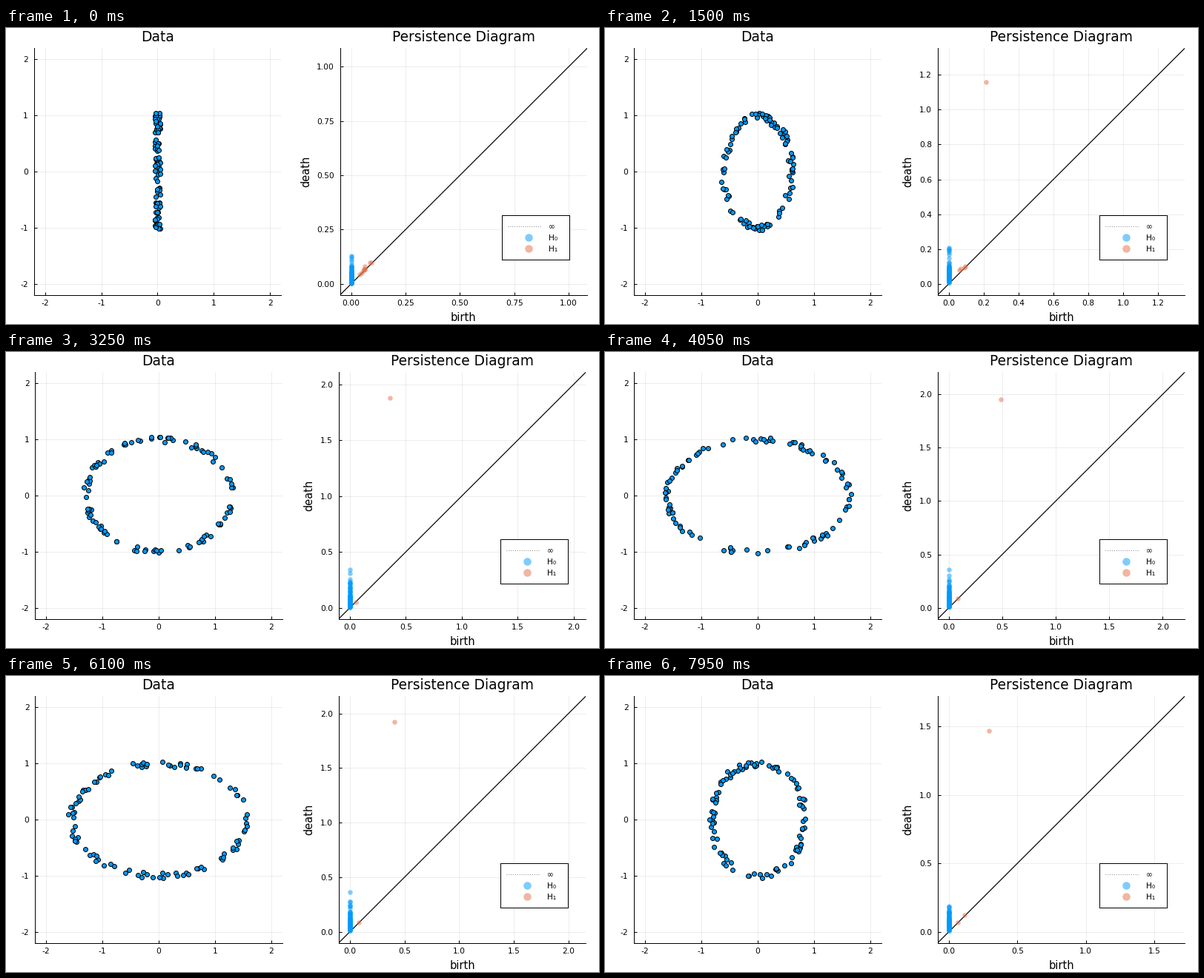
Animation of 800x400 px, one loop 8000 ms. Source, as a matplotlib script:

```python
import numpy as np
import matplotlib.pyplot as plt
from matplotlib.animation import FuncAnimation

W, H = 800, 400
FRAMES, INTERVAL = 160, 50
N = 100
NOISE = 0.1
SIDE, BASE = 333.8, 360.9        # plot size and lower edge, in pixels
BLUE, CORAL = "#009AFA", "#E26F46"

rng = np.random.default_rng(11)


def px(v):
    """Pixels to points at 100 dpi."""
    return v * 0.72


plt.rcParams.update({
    "font.family": "DejaVu Sans",
    "axes.unicode_minus": False,
    "axes.linewidth": px(1),
    "axes.axisbelow": True,
})


def sample(n):
    """Noisy ellipse whose width grows to 2 and shrinks again."""
    width = 0.02 * (n if n <= 100 else 200 - n)
    angle = rng.uniform(0, 2 * np.pi, N)
    ring = np.column_stack([width * np.cos(angle), np.sin(angle)])
    return ring + rng.uniform(-NOISE / 2, NOISE / 2, (N, 2))


def persistence(pts):
    """Rips persistence in degrees 0 and 1, and the enclosing radius.

    Live cocycles are kept as one neighbour bit mask per point.
    """
    diff = pts[:, None] - pts[None]
    dist = np.hypot(diff[..., 0], diff[..., 1])
    reach = dist.max(axis=1).min()
    a, b = np.triu_indices(N, 1)
    order = np.argsort(dist[a, b])
    a, b = a[order], b[order]

    near, comp = [0] * N, list(range(N))
    live, deaths, loops = [], [], []
    for i, j, d in zip(a.tolist(), b.tolist(), dist[a, b].tolist()):
        if d > reach:
            break
        bi, bj = 1 << i, 1 << j
        common = near[i] & near[j]

        def mismatch(rows):
            v = (rows[i] ^ rows[j]) & common
            return v ^ common if rows[i] & bj else v

        if not common:
            if comp[i] != comp[j]:
                old, new = comp[j], comp[i]
                comp = [new if c == old else c for c in comp]
                deaths.append(d)
            else:
                rows = [0] * N
                rows[i], rows[j] = bj, bi
                live.append((d, rows))
        elif live:
            first = common & -common
            for _, rows in live:
                if (rows[i] ^ rows[j]) & first:
                    rows[i] |= bj
                    rows[j] |= bi
            while True:
                bad = 0
                for _, rows in live:
                    bad |= mismatch(rows)
                if not bad:
                    break
                k = bad & -bad
                hit = [c for c in live if mismatch(c[1]) & k]
                youngest = hit.pop()
                live.remove(youngest)
                loops.append((youngest[0], d))
                for _, rows in hit:
                    rows[:] = [p ^ q for p, q in zip(rows, youngest[1])]
        near[i] |= bj
        near[j] |= bi
    return deaths, loops, reach


def tick_step(top):
    if top < 1.25:
        return 0.25
    return 0.2 if top < 1.5 else 0.5


def place(ax, left, bottom, w, h):
    ax.set_position([left / W, 1 - bottom / H, w / W, h / H])


def make_axes(title):
    ax = fig.add_axes([0, 0, 1, 1])
    ax.spines[["top", "right"]].set_visible(False)
    ax.grid(True, color="black", alpha=0.1, linewidth=px(0.67))
    ax.tick_params(direction="in", length=px(4), width=px(1),
                   labelsize=px(10.67))
    ax.tick_params(axis="x", pad=px(6))
    ax.tick_params(axis="y", pad=px(7.6))
    note(ax, title, (0.5, 1), (0, 9.1), 18.67)
    return ax


def note(ax, text, at, shift, size, rotation=0):
    return ax.annotate(
        text, at, xycoords="axes fraction",
        xytext=(px(shift[0]), px(shift[1])), textcoords="offset points",
        fontsize=px(size), ha="center", va="baseline",
        rotation=rotation, rotation_mode="anchor", annotation_clip=False)


def dots(ax, color, size):
    return ax.plot([], [], "o", color=color, alpha=0.5,
                   markersize=px(size), markeredgewidth=0)[0]


fig = plt.figure(figsize=(W / 100, H / 100), dpi=100, facecolor="white")

data_ax = make_axes("Data")
data_ax.set(xlim=(-2.2, 2.2), ylim=(-2.2, 2.2))
data_ax.set_xticks(range(-2, 3))
data_ax.set_yticks(range(-2, 3))
cloud, = data_ax.plot([], [], "o", color=BLUE, markersize=px(6),
                      markeredgecolor="black", markeredgewidth=px(1))

pd_ax = make_axes("Persistence Diagram")
note(pd_ax, "birth", (0.5, 0), (0, -35.1), 14.67)
death_label = note(pd_ax, "death", (0, 0.5), (0, 0), 14.67, rotation=90)
diagonal, = pd_ax.plot([], [], color="black", linewidth=px(1.2))
h0_dots = dots(pd_ax, BLUE, 6.5)
h1_dots = dots(pd_ax, CORAL, 6.5)

key = fig.add_axes([0, 0, 0.1, 0.1], zorder=5)
key.plot([8, 54], [15.2, 15.2], color="#666666", linewidth=px(0.8),
         linestyle=(0, (1.2, 2.4)))
for y, text, color in ((15.2, "∞", None), (30.2, "H₀", BLUE),
                       (45.2, "H₁", CORAL)):
    if color:
        dots(key, color, 10.5).set_data([36], [y])
    key.text(63, y + 4.2, text, fontsize=px(10.67), va="baseline")
key.set(xlim=(0, 91), ylim=(60.5, 0), xticks=[], yticks=[])

clouds = [sample(n) for n in range(FRAMES)]
diagrams = [persistence(pts) for pts in clouds]


def draw(n):
    cloud.set_data(*clouds[n].T)

    deaths, loops, reach = diagrams[n]
    low, top = -0.05 * reach, 1.05 * reach
    step = tick_step(top)
    wide = step == 0.25          # two-decimal labels shift the layout

    left = 450.5 if wide else 448.6
    place(data_ax, 37.5 if wide else 39.1, BASE, SIDE, SIDE)
    place(pd_ax, left, BASE, SIDE, SIDE)
    place(key, left + 218.5, 313, 91, 60.5)
    death_label.set_position((px(-41 if wide else -35.1), 0))

    ticks = np.arange(0, top, step)
    labels = [f"{t:.{2 if wide else 1}f}" for t in ticks]
    pd_ax.set_xticks(ticks, labels)
    pd_ax.set_yticks(ticks, labels)
    pd_ax.set(xlim=(low, top), ylim=(low, top))

    diagonal.set_data([low, top], [low, top])
    h0_dots.set_data(np.zeros(len(deaths)), deaths)
    h1_dots.set_data([p[0] for p in loops], [p[1] for p in loops])
    return cloud, diagonal, h0_dots, h1_dots


anim = FuncAnimation(fig, draw, frames=FRAMES, interval=INTERVAL,
                     repeat=True, repeat_delay=0, blit=False)
plt.show()
```
